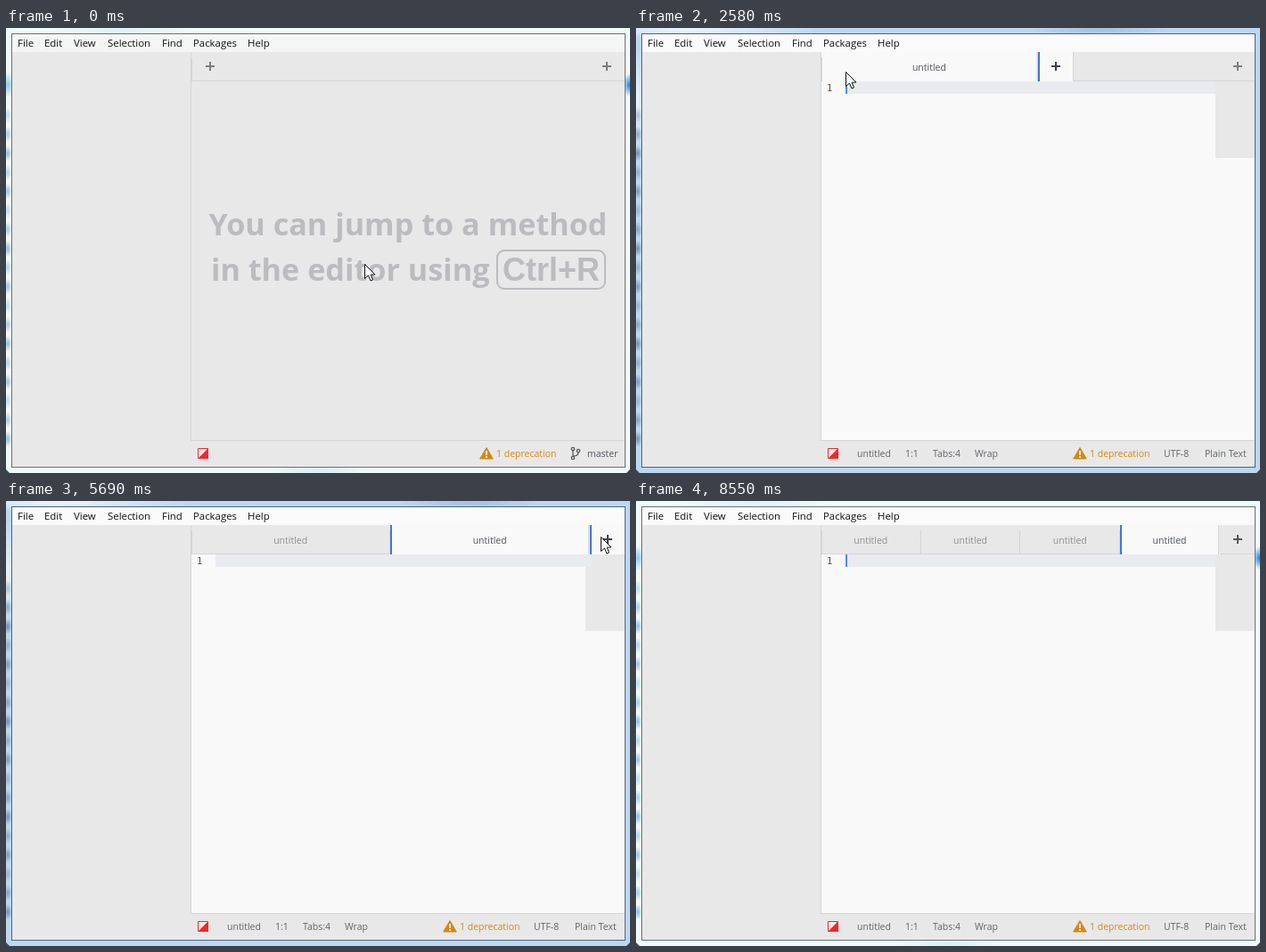
Recreate the animation shown at these times as an HTML page with a canvas. Size 700 by 500 pixels, loop 8.65 s.

```html
<!DOCTYPE html>
<html lang="en">
<head>
<meta charset="utf-8">
<title>Editor tabs</title>
<style>
html, body { margin: 0; width: 100%; height: 100%; overflow: hidden; }
canvas { display: block; }
</style>
</head>
<body>
<canvas id="stage" width="700" height="500"></canvas>
<script>
const ctx = document.getElementById('stage').getContext('2d');
const LOOP = 8650;
const SANS = '"Open Sans", "Noto Sans", sans-serif';
const PANEL = '#e8e8e8', PAPER = '#f9f9f9', LINE = '#d5d5d6', BLUE = '#3f78dc';
const TAB_TOP = 27, TAB_H = 33;

// Moments at which each tab opens, and when the mouse button goes down.
const opened = [2550, 4490, 6060, 6780];
const presses = [2220, 4490, 6060, 6780];

// Pointer way points: time, x, y.
const path = [
  [1200, 401.5, 264.5], [2050, 234.5, 48.5], [3120, 234.5, 48.5],
  [3370, 266, 89], [3620, 400, 94], [3900, 469.5, 53.5],
  [4680, 469.5, 53.5], [5450, 667, 39.5], [7540, 667, 39.5], [7800, 672, 505]
];

const clamp = v => Math.max(0, Math.min(1, v));
const ramp = (t, start, length) => clamp((t - start) / length);
const ease = v => v * v * (3 - 2 * v);

function box(x, y, w, h, color, alpha = 1) {
  ctx.globalAlpha = alpha;
  ctx.fillStyle = color;
  ctx.fillRect(x, y, w, h);
  ctx.globalAlpha = 1;
}

function text(str, x, y, color, font = `10.5px ${SANS}`, align = 'left') {
  ctx.font = font;
  ctx.textAlign = align;
  ctx.fillStyle = color;
  ctx.fillText(str, x, y);
}

function poly(points, fill, stroke) {
  ctx.beginPath();
  points.forEach(([x, y]) => ctx.lineTo(x, y));
  ctx.closePath();
  if (fill) { ctx.fillStyle = fill; ctx.fill(); }
  if (stroke) { ctx.strokeStyle = stroke; ctx.lineWidth = 1; ctx.stroke(); }
}

function blob(x, y, rx, ry, color, alpha) {
  ctx.save();
  ctx.translate(x, y);
  ctx.scale(rx, ry);
  const g = ctx.createRadialGradient(0, 0, 0, 0, 0, 1);
  g.addColorStop(0, color);
  g.addColorStop(1, color + '00');
  ctx.globalAlpha = alpha;
  ctx.fillStyle = g;
  ctx.fillRect(-1, -1, 2, 2);
  ctx.restore();
}

// Translucent window border; `active` blends from pale to blue.
function glass(active) {
  box(0, 0, 700, 500, '#effafb');
  blob(2, 64, 8, 14, '#8cc9f2', 1);
  blob(699, 64, 7, 13, '#1b86ec', 1);
  blob(350, 498, 60, 6, '#cdeeee', 0.8);
  blob(130, 2, 80, 6, '#d5f2f5', 0.9);
  if (active) {
    box(0, 0, 700, 500, '#bdd7f1', active);
    blob(60, 2, 150, 9, '#edf5fc', active);
    blob(520, 2, 80, 8, '#94b8dc', active * 0.7);
    blob(2, 80, 9, 60, '#eaf3fb', active);
  }
  for (let y = 98, i = 0; y < 475; y += 21.4, i++)
    blob(2, y, 5, 9, active > 0.5 ? '#4d719b' : '#6f9cc4', 0.35 + (i * 7 % 5) * 0.09);
  poly([[0, 496], [0, 500], [4, 500]], '#3c4650');
  poly([[700, 496], [700, 500], [696, 500]], '#3c4650');
}

function frame(active, open) {
  glass(active);
  box(7, 7, 687, 20, open ? '#fafafa' : '#f3f6f5');
  box(7, 27, 687, 467, PANEL);
  ctx.strokeStyle = active > 0.5 ? '#4b6682' : '#6a7073';
  ctx.lineWidth = 1;
  ctx.strokeRect(6.5, 6.5, 688, 487);
  const menu = { File: 13, Edit: 43, View: 76, Selection: 114, Find: 175, Packages: 210, Help: 271 };
  for (const name in menu) text(name, menu[name], 21, '#101010', `11.4px ${SANS}`);
}

function statusBar(open) {
  box(207, 463, 487, 1, LINE);
  poly([[215.5, 472.5], [226.5, 472.5], [226.5, 483.5], [215.5, 483.5]], '#fbeeee', '#ee2a2e');
  poly([[227, 472], [227, 484], [215, 484]], '#ee2a2e');
  const x = open ? 490 : 531;
  ctx.lineJoin = 'round';
  poly([[x + 8, 471.5], [x + 15.3, 484], [x + 0.7, 484]], '#d5880f', '#d5880f');
  ctx.lineJoin = 'miter';
  box(x + 7, 475, 2, 5, PANEL);
  box(x + 7, 481, 2, 2, PANEL);
  text('1 deprecation', x + 19, 482, '#d5880f');
  if (open) {
    const items = { untitled: 248, '1:1': 302, 'Tabs:4': 333, Wrap: 380, 'UTF-8': 592, 'Plain Text': 638 };
    for (const name in items) text(name, items[name], 482, '#606469');
  } else {
    text('master', 652, 482, '#55585e');
    branchIcon();
  }
}

function branchIcon() {
  ctx.strokeStyle = '#55585e';
  ctx.lineWidth = 1.3;
  for (const [x, y] of [[636, 473], [636, 483], [642, 475]]) {
    ctx.beginPath();
    ctx.arc(x, y, 1.7, 0, 7);
    ctx.stroke();
  }
  ctx.beginPath();
  ctx.moveTo(636, 475);
  ctx.lineTo(636, 481);
  ctx.quadraticCurveTo(642, 481, 642, 477);
  ctx.stroke();
}

function key(label, x, y, w) {
  ctx.strokeStyle = '#bcbbc0';
  ctx.lineWidth = 2;
  ctx.beginPath();
  ctx.roundRect(x, y, w, 43, 8);
  ctx.stroke();
  text(label, x + 6, y + 34, '#bcbbc0', 'bold 36px "Liberation Sans", Arial, sans-serif');
}

function tips(t) {
  const big = (str, x, y, align = 'center') =>
    text(str, x, y, '#bcbbc0', `bold 34.2px ${SANS}`, align);
  ctx.globalAlpha = 1 - ease(ramp(t, 1670, 300));
  if (ctx.globalAlpha) {
    big('You can jump to a method', 451, 233);
    big('in the editor using', 230, 284, 'left');
    key('Ctrl+R', 551, 250, 121);
  }
  ctx.globalAlpha = ease(ramp(t, 1970, 300));
  if (ctx.globalAlpha) {
    big('You can install packages and', 451, 208);
    big('themes from the Settings', 451, 259);
    big('View', 353, 310, 'left');
    key('Ctrl+,', 445, 276, 105);
  }
  ctx.globalAlpha = 1;
}

function plus(x, color) {
  box(x - 5, 42, 10, 2, color);
  box(x - 1, 38, 2, 10, color);
}

// Accent strip that grows from its middle.
function accent(x, level) {
  const h = TAB_H * level;
  box(x, TAB_TOP + (TAB_H - h) / 2, 2, h, BLUE, level);
}

function plusTab(x, w, center, hover, idle = '#7c7c82') {
  box(x, TAB_TOP, w, TAB_H - (hover < 1), PAPER, clamp(hover * 1.5));
  accent(x, hover);
  plus(center, hover > 0.4 ? '#3d414b' : idle);
}

function tabBar(t, count) {
  box(207, 27, 1, 437, LINE);
  box(208, 59, 486, 1, LINE);
  if (!count) {
    box(208, 34, 1, 25, LINE);
    const hover = ramp(t, 1940, 120);
    plusTab(209, 40, 229, hover);
    if (hover) box(248, 33, 1, 27, LINE);
    plus(674, '#7c7c82');
    return;
  }
  const width = count === 1 ? 243 : 447 / count;
  for (let i = 0; i < count; i++) {
    const x = Math.round(208 + i * width - 0.1);
    const last = i === count - 1;
    const fade = last ? 0 : ramp(t, opened[i + 1] + 80, 160);
    box(x, TAB_TOP, Math.round(width), TAB_H - !last, PAPER, 1 - fade);
    box(x - (i > 0), 33, 1, 27, LINE);
    accent(x, ramp(t, opened[i] + 80, 160) * (1 - fade));
    text('untitled', 208 + (i + 0.5) * width - 0.6, 48, last ? '#50545c' : '#8e8f93',
      `10.5px ${SANS}`, 'center');
  }
  if (count === 1) {
    const hover = t < 3500 ? 1 - ramp(t, opened[0] + 80, 160) : ramp(t, 3830, 120);
    box(449, 27, 4, 32, PANEL);
    box(450, 27, 1, 33, LINE);
    plusTab(451, 39, 471, hover, '#77777c');
    box(490, 27, 1, 33, LINE);
    plus(675, '#7c7c82');
  } else {
    const hover = ramp(t, 5380, 140) * (1 - ramp(t, 7600, 140));
    box(653, 27, 41, 32, PANEL);
    box(653, 27, 1, 33, LINE);
    plusTab(655, 39, 675, hover, '#56575c');
  }
}

function editor(t, count) {
  box(208, 60, 486, 403, PAPER);
  box(650, 60, 44, 86, PANEL);
  const overRight = t > 5450 && t < 7600;
  box(235, 60, overRight ? (count > 2 ? 443 : 422) : 415, 14, '#e9ebef');
  text('1', 214, 71, '#5f5047', '10.5px "DejaVu Sans Mono", monospace');
  const blink = Math.floor((t - opened[count - 1]) / 400) % 2;
  if (!blink) box(235, 60, 2, 14, '#5089ee');
}

function pointer(t) {
  if (t >= 7800) return;
  let i = path.findIndex(p => p[0] > t);
  const [t0, x0, y0] = path[Math.max(0, i - 1)], [t1, x1, y1] = path[i];
  const raw = ramp(t, t0, t1 - t0);
  const inBend = t > 3120 && t < 3900;
  const k = inBend ? raw : ease(raw);
  const x = Math.round(x0 + (x1 - x0) * k), y = Math.round(y0 + (y1 - y0) * k);
  if (presses.some(p => t >= p && t < p + 180)) {
    ctx.strokeStyle = '#111';
    ctx.lineWidth = 1;
    ctx.beginPath();
    ctx.arc(x + 0.5, y + 0.5, 10.5, 0, 7);
    ctx.stroke();
  }
  const shape = [[0, 0], [0, 16], [4, 12.5], [6.5, 18.5], [9, 17.5], [6.7, 11.7], [11.5, 11.5]];
  poly(shape.map(([a, b]) => [x + a + 0.5, y + b + 0.5]), '#fff', '#111');
}

function draw(t) {
  const count = opened.filter(o => t >= o).length;
  const active = ramp(t, 2260, 200) * (1 - ramp(t, 8380, 150));
  frame(active, count > 0);
  if (count) editor(t, count);
  else tips(t);
  tabBar(t, count);
  statusBar(count > 0);
  pointer(t);
}

const start = performance.now();
function tick() {
  draw((performance.now() - start) % LOOP);
  requestAnimationFrame(tick);
}
tick();
</script>
</body>
</html>
```
